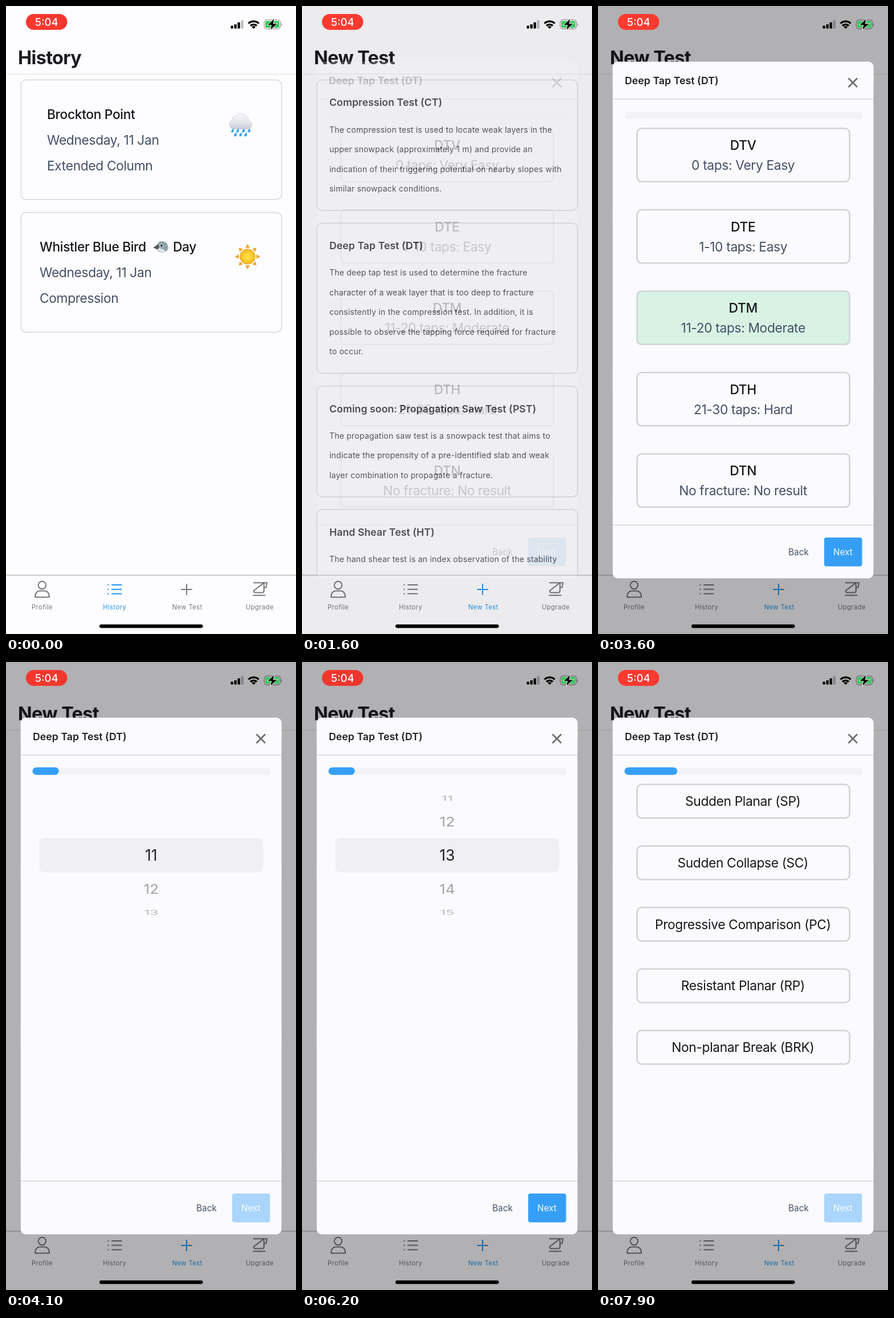
An HTML page for the animation above (8 s loop, 509 by 1100 pixels).

```html
<!DOCTYPE html>
<html lang="en">
<head>
<meta charset="utf-8">
<style>
  html, body { margin: 0; width: 100%; height: 100%; overflow: hidden; background: #fdfcfe; }
  svg { display: block; width: 509px; height: 1100px; font-family: Inter, sans-serif; }
  .title { font-size: 32.4px; font-weight: 700; letter-spacing: -.65px; fill: #1c1b1f; }
  .lg { font-size: 22.8px; letter-spacing: -.37px; fill: #18181b; }
  .med { font-weight: 500; }
  .sub { fill: #445066; }
  .head { font-size: 17.7px; font-weight: 600; letter-spacing: .05px; fill: #1f1f23; }
  .body { font-size: 14px; letter-spacing: .22px; fill: #29292d; }
  .btn { font-size: 15.2px; letter-spacing: .1px; }
  .tab { color: #77777b; }
  .tab.on { color: #2196ec; }
  .tab text { font-size: 11.2px; letter-spacing: .45px; fill: currentColor; }
  .tab path { fill: none; stroke: currentColor; stroke-width: 2; stroke-linecap: round; stroke-linejoin: round; }
  .mid { text-anchor: middle; }
  .num { font-size: 26.5px; text-anchor: middle; }
  .card { fill: none; stroke: #d5d5da; stroke-width: 1.4; }
  .option { fill: none; stroke: #d2d2d9; stroke-width: 2.6; }
  .rule { stroke: #d0d0d4; stroke-width: 1.3; }
</style>
</head>
<body>
<svg id="stage" viewBox="0 0 509 1100"></svg>
<script>
const text = (x, y, cls, s) => `<text x="${x}" y="${y}" class="${cls}">${s}</text>`;
const rect = (x, y, w, h, rx, attrs) =>
  `<rect x="${x}" y="${y}" width="${w}" height="${h}" rx="${rx}" ${attrs}/>`;
const range = (n, fn) => Array.from({ length: n }, (_, i) => fn(i)).join('');
const rule = (x1, x2, y) => `<path class="rule" d="M${x1} ${y}H${x2}"/>`;
const card = (y, h) => rect(26.2, y, 457.4, h, 9, 'class="card"');

// Emoji
const sun = `<g transform="translate(424 439)">
  ${range(8, i => `<path d="M-4 -15.5L0 -22L4 -15.5Z" fill="#eda323" transform="rotate(${i * 45})"/>`)}
  <circle r="13.3" fill="url(#sunFill)" stroke="#e79a1c" stroke-width=".8"/></g>`;
const rain = `<g transform="translate(411.5 207)">
  <path d="M-13 8.5A9 9 0 0 1-14.5-8A7 7 0 0 1-7-14.5A11 11 0 0 1 11-13A9 9 0 0 1 15.5-6.5A8 8 0 0 1 14 8.5Z"
    fill="url(#cloudFill)" stroke="#cfcfd8" stroke-width=".8"/>
  ${[[-14, 11], [-5, 11], [5, 11], [15, 11], [-9, 18], [0, 18], [9, 18]].map(([x, y]) =>
    `<path d="M2 -4.5C3.5 0 3 4 -.5 4C-4 4-3.5 0 2-4.5Z" fill="#3aa2e0" transform="translate(${x} ${y}) scale(.85)"/>`).join('')}</g>`;
const bird = `<g transform="translate(272 421.5)">
  <path d="M-5-7C0-12 12-10 12.5 1C13 9 5 11 0 10C-5 9-8 5-7-1Z" fill="#8fa5ae"/>
  <path d="M-6 3C0 2 6 5 9 9C4 11-4 11-6 3Z" fill="#dfe4e6"/>
  <path d="M-6-4L-13.5 2L-6 5C-3 3-3-3-6-4Z" fill="#55565c"/>
  <circle cx="1" cy="-2" r="2.8" fill="#f4f4f4"/><circle cx="1" cy="-2" r="1.9" fill="#18181a"/></g>`;

const history = text(21, 102, 'title', 'History')
  + card(129.5, 209.5) + card(361.5, 210)
  + text(72, 198, 'lg med', 'Brockton Point')
  + text(72, 243.2, 'lg sub', 'Wednesday, 11 Jan')
  + text(72, 288.3, 'lg sub', 'Extended Column')
  + text(59, 429.6, 'lg med', 'Whistler Blue Bird')
  + text(293, 429.6, 'lg med', 'Day')
  + text(59, 474.8, 'lg sub', 'Wednesday, 11 Jan')
  + text(59, 520, 'lg sub', 'Compression')
  + rain + sun + bird;

const tests = [
  [129.5, 228.5, 'Compression Test (CT)', [
    'The compression test is used to locate weak layers in the',
    'upper snowpack (approximately 1 m) and provide an',
    'indication of their triggering potential on nearby slopes with',
    'similar snowpack conditions.']],
  [380.2, 263.3, 'Deep Tap Test (DT)', [
    'The deep tap test is used to determine the fracture',
    'character of a weak layer that is too deep to fracture',
    'consistently in the compression test. In addition, it is',
    'possible to observe the tapping force required for fracture',
    'to occur.']],
  [665.8, 194.2, 'Coming soon: Propagation Saw Test (PST)', [
    'The propagation saw test is a snowpack test that aims to',
    'indicate the propensity of a pre-identified slab and weak',
    'layer combination to propagate a fracture.']],
  [882, 200, 'Hand Shear Test (HT)', [
    'The hand shear test is an index observation of the stability']],
];
const newTest = text(21, 102, 'title', 'New Test') + tests.map(([y, h, name, lines]) =>
  card(y, h) + text(48, y + 45.7, 'head', name)
  + lines.map((s, i) => text(48, y + 92 + i * 34.5, 'body', s)).join('')).join('');

const tabs = [
  ['Profile', 63.5, 'M56.7 1014.5a6.7 6.7 0 1 0 13.4 0a6.7 6.7 0 1 0-13.4 0ZM51 1035.5C51 1028 55 1024.5 59 1024.5H68C72 1024.5 76 1028 76 1035.5Z'],
  ['History', 190.7, 'M186 1014H202.5M186 1021.7H202.5M186 1029.4H202.5M179 1014h.6M179 1021.7h.6M179 1029.4h.6'],
  ['New Test', 318.2, 'M308 1022H326M317 1013V1031'],
  ['Upgrade', 445.5, 'M434.8 1010.3H458L456.5 1018.5H452.8M452.8 1010.3V1024Q452.8 1027.5 449.5 1027.5H438Q434.8 1027.5 434.8 1024ZM434 1032.3H454.5'],
];
const tabBar = rect(0, 997, 509, 103, 0, 'fill="#fdfcfe"')
  + '<path d="M0 997H509" stroke="#bcbcc0" stroke-width="1.5"/>'
  + tabs.map(([name, x, d]) =>
    `<g class="tab"><path d="${d}"/>${text(x, 1057.2, 'mid', name)}</g>`).join('');

const grades = [['DTV', '0 taps: Very Easy'], ['DTE', '1-10 taps: Easy'], ['DTM', '11-20 taps: Moderate'],
  ['DTH', '21-30 taps: Hard'], ['DTN', 'No fracture: No result']];
const gradeList = grades.map(([code, label], i) => {
  const y = 214.5 + i * 142.5;
  return rect(68.6, y, 373, 93.3, 8, `class="option" id="${code}"`)
    + text(254.7, y + 37.6, 'lg med mid', code) + text(254.7, y + 72.7, 'lg sub mid', label);
}).join('');

const fractures = ['Sudden Planar (SP)', 'Sudden Collapse (SC)', 'Progressive Comparison (PC)',
  'Resistant Planar (RP)', 'Non-planar Break (BRK)'];
const fractureList = fractures.map((name, i) => {
  const y = 214.5 + i * 107.75;
  return rect(68.6, y, 373, 58.7, 8, 'class="option"') + text(254.3, y + 37.6, 'lg mid', name);
}).join('');

const modal = rect(25.7, 97.5, 458, 905, 9, 'fill="#fbfafd"')
  + text(47, 137, 'head', 'Deep Tap Test (DT)')
  + '<path d="M439.5 126.5L455 142M455 126.5L439.5 142" stroke="#6a6a6e" stroke-width="2.6"/>'
  + rule(26, 483.5, 163.2) + rule(26, 483.5, 909.3)
  + rect(48, 185, 416, 12.5, 4, 'fill="#f3f2f5"')
  + rect(46.5, 184.5, 0, 13.3, 6.6, 'id="progress" fill="#369ff5"')
  + `<g id="grades">${gradeList}</g>`
  + `<g id="picker"><g id="dimNums" fill="#98989d"></g>
     ${rect(58.5, 308, 393, 60.5, 9, 'fill="#f0eff3"')}
     <g id="darkNums" fill="#202024" clip-path="url(#band)"></g></g>`
  + `<g id="fractures">${fractureList}</g>`
  + text(334, 962.2, 'btn sub', 'Back')
  + rect(397, 931, 66.5, 50.5, 4, 'id="next"')
  + text(430, 962.2, 'btn mid" fill="#fafcff', 'Next');

const statusBar = rect(35, 14, 72.5, 27.8, 13.9, 'id="pill"')
  + text(71.3, 34.8, 'mid" font-size="18.6" font-weight="500" fill="#fff', '5:04')
  + [5, 7.5, 11, 14.5].map((h, i) =>
    rect(394.5 + i * 6, 39.5 - h, 4.3, h, 1.2, i < 3 ? '' : 'fill-opacity=".25"')).join('')
  + `<path d="M425.5 30.5A13.5 13.5 0 0 1 443.7 30.5M429 34.6A8.4 8.4 0 0 1 440.2 34.6"
      fill="none" stroke="#000" stroke-width="3.3"/>
     <path d="M434.6 40L431 36.6A5 5 0 0 1 438.2 36.6Z"/>`
  + rect(453.2, 24.2, 28.6, 15.8, 4.8, 'fill="none" stroke="#000" stroke-opacity=".38" stroke-width="1.3"')
  + rect(455.2, 26.2, 24.6, 11.8, 2.8, 'fill="#34c759"')
  + `<path d="M483.3 29.7Q486.2 32 483.3 34.7Z" fill-opacity=".4"/>
     <path d="M470.5 22.8L459.5 33.3H466.3L464.3 41.4L475.6 30.9H468.6Z" stroke="#fdfcfe" stroke-width="1.6" paint-order="stroke"/>`
  + rect(164, 1083.2, 181.5, 6.2, 3.1, '');

document.getElementById('stage').innerHTML = `<defs>
  <clipPath id="band">${rect(58, 308, 394, 60.5, 0, '')}</clipPath>
  <radialGradient id="sunFill"><stop offset=".2" stop-color="#ffdf3e"/><stop offset="1" stop-color="#f6b629"/></radialGradient>
  <linearGradient id="cloudFill" x2="0" y2="1"><stop stop-color="#f7f7fa"/><stop offset=".6" stop-color="#e4e4ec"/><stop offset="1" stop-color="#c9c9d6"/></linearGradient>
  </defs>
  ${rect(0, 0, 509, 1100, 0, 'fill="#fdfcfe"')}
  <g id="history">${history}</g><g id="newTest">${newTest}</g>
  ${rule(0, 509, 119.3).replace('/>', ' opacity=".5"/>')}${tabBar}
  ${rect(0, 0, 509, 1100, 0, 'id="shade"')}
  <g id="modal">${modal}</g>${statusBar}`;

const el = id => document.getElementById(id);
const show = (id, on) => el(id).setAttribute('display', on ? 'inline' : 'none');
const ramp = (t, start, length) => Math.min(1, Math.max(0, (t - start) / length));
const tabEls = document.querySelectorAll('.tab');

// Rows sit on a cylinder seen from the side.
function wheel(pos) {
  const R = 113, step = 31.2 * Math.PI / 180;
  let rows = '';
  for (let n = 11; n <= 20; n++) {
    const a = (n - pos) * step;
    if (Math.abs(a) > 1.5) continue;
    const c = Math.cos(a);
    rows += `<text class="num" y="9.6" opacity="${.35 + .65 * c}"
      transform="translate(254.8 ${338.8 + R * Math.sin(a)}) scale(${.9 + .1 * c} ${c})">${n}</text>`;
  }
  el('dimNums').innerHTML = el('darkNums').innerHTML = rows;
}

const TAB = 500, OPEN = 1545, PICK = 3000, COUNT = 4100, SPIN = 4600, SETTLED = 5750, FRACTURE = 6800;

function draw(t) {
  const onTests = t >= TAB;
  show('history', !onTests);
  show('newTest', onTests);
  tabEls.forEach((tab, i) => tab.classList.toggle('on', i === (onTests ? 2 : 1)));

  const open = ramp(t, OPEN, 250);
  el('shade').setAttribute('opacity', .3 * open);
  el('modal').setAttribute('opacity', open);

  const step = t < COUNT ? 0 : t < FRACTURE ? 1 : 2;
  ['grades', 'picker', 'fractures'].forEach((id, i) => show(id, i === step));
  el('progress').setAttribute('width', 46.3 * step);
  el('DTM').style.fill = t >= PICK ? '#d8f3e3' : 'none';
  const ready = (step === 0 && t >= PICK) || (step === 1 && t >= SETTLED);
  el('next').setAttribute('fill', ready ? '#369ff5' : '#abd5fa');
  if (step === 1) wheel(13 - 2 * (1 - ramp(t, SPIN, 1100)) ** 3);

  const glow = .5 + .5 * Math.cos((t - 1700) / 1000 * Math.PI);
  el('pill').setAttribute('fill', `rgb(${226 + 28 * glow},${50 + 8 * glow},${42 + 6 * glow})`);
}

function tick(now) {
  draw(now % 8000);
  requestAnimationFrame(tick);
}
draw(0);
requestAnimationFrame(tick);
</script>
</body>
</html>
```
